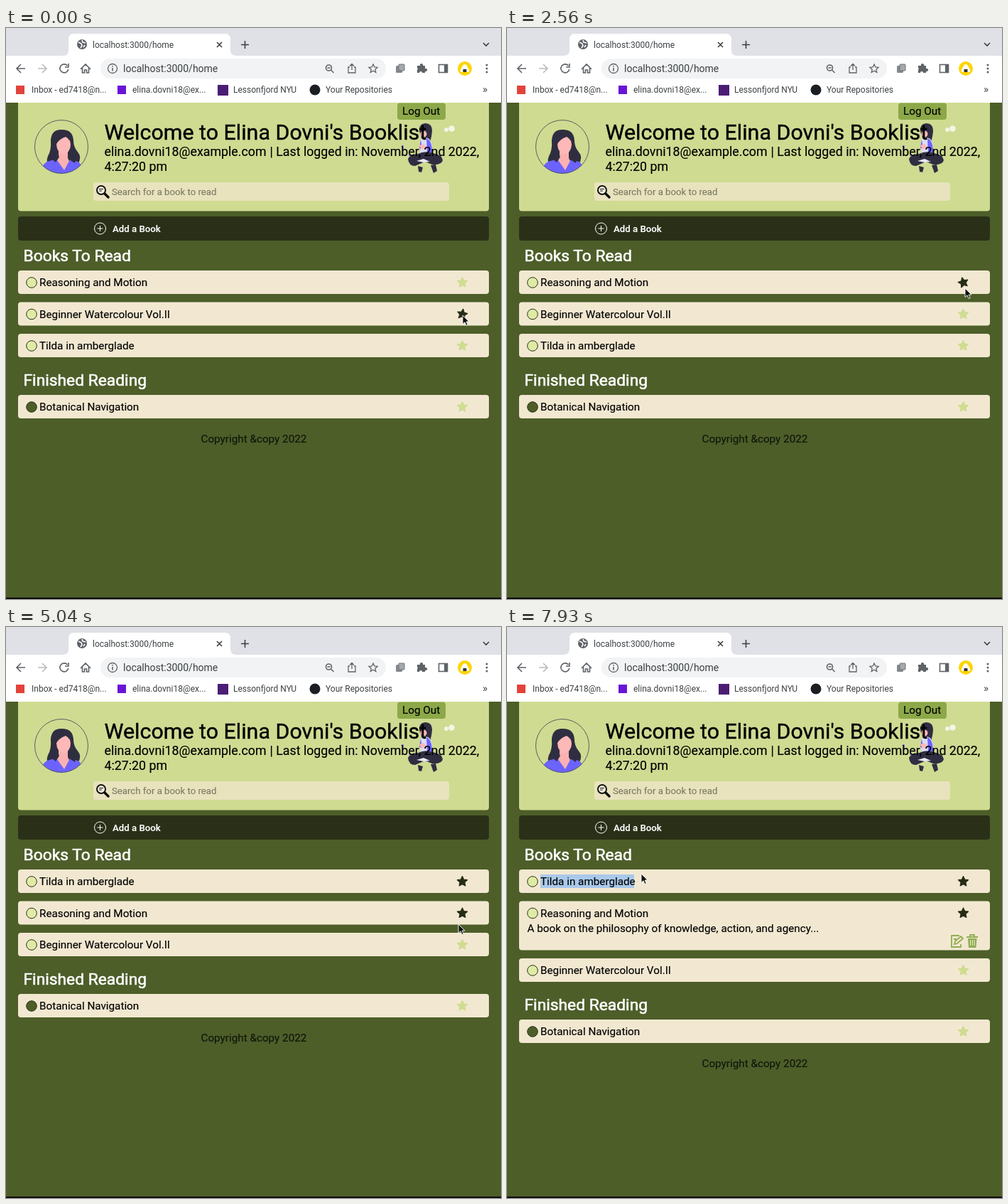
Write an HTML page that moves like this. It is 697 px wide and 803 px high and loops after 8000 ms.

```html
<!DOCTYPE html>
<html lang="en">
<head>
<meta charset="utf-8">
<title>Booklist</title>
<style>
  html, body { margin: 0; width: 100%; height: 100%; overflow: hidden; background: #4d5e29; }
  svg { display: block; width: 697px; height: 803px; font: 15.25px Roboto, sans-serif; }
  .ui { font-size: 12px; fill: #3c4043; }
  .line { fill: none; stroke: #5f6368; stroke-width: 1.6; }
  .page text { stroke-width: .15px; stroke: currentColor; fill: currentColor; }
  .page .big { font-size: 30.4px; stroke-width: .4px; }
  .mid { font-size: 17.8px; }
  .page .head { font-size: 22.8px; color: #fff; stroke-width: .6px; }
  .small { font-size: 13.2px; }
</style>
</head>
<body>
<svg viewBox="0 0 697 803">
  <!-- browser window -->
  <rect width="697" height="40" fill="#dfe1e6"/>
  <rect y="39" width="697" height="66" fill="#fff"/>
  <path d="M80 39q8 0 8-8V16q0-8 8-8H308q8 0 8 8V31q0 8 8 8z" fill="#fff"/>
  <rect x="133" y="43" width="402" height="28" rx="14" fill="#f1f3f4"/>
  <circle cx="107" cy="23" r="7" fill="#5f6368"/>
  <path d="M102 20l4 2 1 3-2 3M107 17l1 3 4 1M109 27l2-3" stroke="#fff" stroke-width="1.6" fill="none"/>
  <g class="line">
    <path d="M297 20l7 7m0-7l-7 7M331 23.500h11m-5.500-5.500v11M672 21l4 4 4-4" stroke="#3c4043"/>
    <path d="M27 57H15m6-6l-6 6 6 6"/>
    <path d="M45 57H57m-6-6l6 6-6 6" stroke="#b8bbbf"/>
    <path d="M86.500 53a6 6 0 1 0 1.300 5M88 50v5h-5"/>
    <path d="M105 58l7-7 7 7M107.500 56v7h3v-4h3v4h3v-7"/>
    <circle cx="150" cy="57" r="6.500" stroke-width="1.300"/><path d="M150 56v4.500m0-7.500v1.500"/>
    <circle cx="454.500" cy="56" r="4"/><path d="M457.500 59l4 4M452.500 56h4" stroke-width="1.500"/>
    <path d="M484 55h-2v8h10v-8h-2M487 59V51m-3 2.500l3-3 3 3" stroke-width="1.300"/>
    <path d="M517 51l1.800 4 4.200.4-3.200 2.900 1 4.200-3.800-2.200-3.800 2.200 1-4.200-3.200-2.900 4.200-.4z" stroke-width="1.300"/>
    <rect x="609.500" y="51.500" width="12" height="11"/>
  </g>
  <path d="M617 51h5v12h-5z" fill="#5f6368"/>
  <rect x="549" y="53" width="9" height="10" rx="1.500" fill="#85898d"/>
  <rect x="553" y="51" width="8" height="9" rx="1" fill="#a6a9ac" stroke="#6f7377"/>
  <path d="M579 53h4a2.200 2.200 0 1 1 4 0h3v4a2.200 2.200 0 1 1 0 4v2h-4a2 2 0 0 0-4 0h-3v-4a2 2 0 0 0 0-3z" fill="#5f6368"/>
  <circle cx="646" cy="57" r="10" fill="#fdd500"/>
  <path d="M646 51q2 0 3 2l3 6q1 3-2 3h-8q-3 0-2-3l3-6q1-2 3-2z" fill="#fff"/>
  <rect x="643.500" y="58" width="5" height="4" fill="#333"/>
  <path d="M677 52v.01M677 57v.01M677 62v.01" stroke="#5f6368" stroke-width="3" stroke-linecap="round"/>
  <rect x="14" y="81" width="12" height="12" fill="#e2433a"/>
  <rect x="157" y="81" width="12" height="12" fill="#6a14d8"/>
  <rect x="298" y="80" width="15" height="15" fill="#4b1d75"/>
  <circle cx="435" cy="87" r="7.500" fill="#1b1f23"/>
  <g class="ui">
    <text x="122" y="27.500">localhost:3000/home</text>
    <text x="165" y="62" font-size="14">localhost:3000/home</text>
    <text x="36" y="91">Inbox - ed7418@n...</text>
    <text x="178" y="91">elina.dovni18@ex...</text>
    <text x="320" y="91">Lessonfjord NYU</text>
    <text x="450" y="91">Your Repositories</text>
    <text x="671" y="91" font-size="15">»</text>
  </g>

  <g class="page">
    <rect y="105" width="697" height="698" fill="#4d5e29"/>
    <path d="M17 105H680V253.500q0 4-4 4H21q-4 0-4-4z" fill="#cfdb91"/>
    <rect x="551" y="105.500" width="68" height="23.500" rx="4" fill="#8ca848"/>

    <!-- profile portrait -->
    <clipPath id="round"><circle cx="78" cy="167" r="37.500"/></clipPath>
    <g clip-path="url(#round)">
      <path d="M63 158Q64 142 79 143 94 143 95 158 95 167 100 173 108 182 101 191L96 194H63Q55 190 59 180 64 172 63 158z" fill="#2f2e41"/>
      <path d="M50 206Q49 190 61 187L72 184 82 199 90 185 101 188Q107 190 108 206z" fill="#6c63ff"/>
      <path d="M74 170h13v13l2 4-7 13-10-14 2-4z" fill="#fbb1b1"/>
      <ellipse cx="81" cy="164" rx="10" ry="13" fill="#ffb8b8"/>
      <path d="M68 166Q67 148 80 148 93 149 93 166 91 157 84 153 75 156 71 163 71 174 75 181L70 189 62 182z" fill="#2f2e41"/>
      <path d="M92 160Q92 174 99 180L97 190 89 185z" fill="#2f2e41"/>
    </g>
    <circle cx="78" cy="167" r="37.500" fill="none" stroke="#3f3d56" stroke-width=".8"/>

    <!-- reading figure -->
    <g fill="#f3f5e6">
      <circle cx="620" cy="143" r="3"/><circle cx="627.500" cy="141.500" r="4.300"/>
    </g>
    <path d="M582 145Q581 135 590 134 600 134 600 145 599 155 597 160L586 157z" fill="#2f2e41"/>
    <circle cx="588" cy="149" r="4.500" fill="#ffb8b8"/>
    <path d="M584 156q6-4 12 0 5 6 4 20H583z" fill="#dcdcf4"/>
    <path d="M592 155q8 3 8 21h-7zM584 157l-2 12 4 1z" fill="#6c63ff"/>
    <path d="M582 165l6-2 4 5-7 3z" fill="#ffb8b8"/>
    <path d="M566 184Q568 178 580 177 590 172 601 176 614 178 615 186 613 193 600 192L590 188 576 194Q567 194 566 184z" fill="#2f2e41"/>
    <path d="M578 187l10-3 9 4-9 1z" fill="#e9e9f5"/>
    <path d="M580 194l7 2-2 7-4-1zM598 193l7-1 2 9-5 3z" fill="#2f2e41"/>
    <path d="M556 167l3-2v9M567 179l4 1" stroke="#6c63ff" fill="none"/>
    <path d="M628 168h3M630 165v6" stroke="#ffb8b8"/>

    <text x="558" y="122">Log Out</text>
    <text class="big" x="138.500" y="156.500">Welcome to Elina Dovni's Booklist</text>
    <g class="mid">
      <text x="138.500" y="180">elina.dovni18@example.com</text>
      <text x="371.500" y="180">| Last logged in: November, 2nd 2022,</text>
      <text x="138.500" y="201">4:27:20 pm</text>
    </g>
    <rect x="123" y="217" width="501" height="26" rx="4" fill="#e8e3bd"/>
    <path d="M139 233l5 5" stroke="#111" stroke-width="3.500" stroke-linecap="round"/>
    <circle cx="134" cy="228" r="6" fill="#f4f1dc" stroke="#111" stroke-width="2"/>
    <path d="M131 226.500h6M131 229h4" stroke="#111" stroke-width="1.200"/>
    <text class="small" x="149" y="234.500" color="#7c7a66">Search for a book to read</text>

    <rect x="17" y="265" width="663" height="34" rx="4" fill="#2a3018"/>
    <circle cx="132.500" cy="282" r="8" fill="none" stroke="#fff"/>
    <path d="M128.500 282h8m-4-4v8" stroke="#fff"/>
    <text class="small" x="150" y="287" color="#fff" font-weight="500">Add a Book</text>
    <text class="head" x="24.500" y="328">Books To Read</text>
    <g id="rows"></g>
    <g id="finished">
      <text class="head" x="24.500" y="503">Finished Reading</text>
      <text x="274.500" y="582.500" color="#12160a">Copyright &amp;copy 2022</text>
    </g>
    <g id="details">
      <text x="28.500" y="429">A book on the philosophy of knowledge, action, and agency...</text>
      <g fill="none" stroke="#8fae52" stroke-width="1.800">
        <path d="M637 434h-11v16h13v-4M630 446l1-4 8-7 3 3-8 7zM629 439h4"/>
        <path d="M647 436h16M652 435v-2h6v2"/>
      </g>
      <path d="M649 438h12.500l-1 13H650z" fill="#8fae52"/>
      <path d="M652.500 440v8m2.800-8v8m2.800-8v8" stroke="#f2e8d1"/>
    </g>
    <rect y="801" width="697" height="2" fill="#0a0a08"/>
  </g>
  <path id="cursor" d="M0 0V12.500L3 9.800 5 14.500 7.200 13.500 5.200 9H9z" fill="#111" stroke="#fff" stroke-width=".9"/>
</svg>
<script>
const LOOP = 8000, STEP = 80, SPIN = 0.18; // SPIN in degrees per ms
const STAR_X = 642.5;
const REORDER = 4160, SELECT = 6320, EXPAND = 6640, DRAG = 7690;
const slots = [357.5, 402, 446.5];
const $ = id => document.getElementById(id);

// time, x, y
const path = [
  [0, 643, 404], [80, 643, 404], [320, 645, 364], [960, 645, 364],
  [1520, 646, 434], [1840, 646, 434], [2320, 645, 366], [3520, 645, 366],
  [3920, 647, 441], [4160, 647, 441], [4440, 645, 523], [4560, 645, 523],
  [5040, 637, 418], [5280, 639, 407], [5840, 113, 404], [6080, 224, 405],
  [6650, 224, 405], [7450, 22, 365], [DRAG, 22, 365], [7840, 194, 352],
  [7920, 189, 347], [LOOP, 189, 347]
];
const spinStarts = [-55, 240, 1040, 2240, 3800, 4640, 5120];

const starPoints = Array.from({ length: 10 }, (_, i) => {
  const r = i % 2 ? 3.6 : 7.4, a = (i / 5 - 0.5) * Math.PI;
  return `${(r * Math.cos(a)).toFixed(2)},${(r * Math.sin(a)).toFixed(2)}`;
}).join(' ');

function makeRow(title, dot) {
  const g = document.createElementNS('http://www.w3.org/2000/svg', 'g');
  g.innerHTML = `
    <rect x="17" y="-16.500" width="663" height="33" rx="4" fill="#f2e8d1"/>
    <rect x="47" y="-9.500" width="0" height="19" fill="#a9c9eb"/>
    <circle cx="36" cy=".5" r="7.300" fill="${dot}" stroke="#2a3018"/>
    <text x="47" y="5.500">${title}</text>
    <polygon points="${starPoints}" stroke-width="1.200" stroke-linejoin="round"/>`;
  $('rows').append(g);
  const [box, mark, , , star] = g.children;
  return { g, box, mark, star };
}

const open = '#dfeba5';
const reasoning = makeRow('Reasoning and Motion', open);
const painting = makeRow('Beginner Watercolour Vol.II', open);
const tilda = makeRow('Tilda in amberglade', open);
const done = makeRow('Botanical Navigation', '#4d5e29');

function cursorAt(t) {
  const i = path.findIndex(p => p[0] > t);
  const [t0, x0, y0] = path[i - 1], [t1, x1, y1] = path[i];
  const u = (t - t0) / (t1 - t0), e = u * u * (3 - 2 * u);
  return [x0 + (x1 - x0) * e, y0 + (y1 - y0) * e];
}

function placeRow(row, y, starred, t, [cx, cy]) {
  row.g.setAttribute('transform', `translate(0 ${y})`);
  const hover = Math.abs(cx - STAR_X) < 9 && Math.abs(cy - y) < 10;
  const start = spinStarts.findLast(s => s <= t);
  const angle = hover ? (t - start) * SPIN : 0;
  const color = hover || starred ? '#262d17' : '#cfdc92';
  row.star.setAttribute('transform', `translate(${STAR_X} .5) rotate(${angle})`);
  row.star.setAttribute('fill', color);
  row.star.setAttribute('stroke', color);
}

function select(row, from, to) {
  row.mark.setAttribute('x', from);
  row.mark.setAttribute('width', Math.max(0, to - from));
}

function draw(time) {
  const t = Math.floor(time % LOOP / STEP) * STEP;
  const cursor = cursorAt(t);
  const moved = t >= REORDER, expanded = t >= EXPAND, shift = expanded ? 36 : 0;
  const order = moved ? [tilda, reasoning, painting] : [reasoning, painting, tilda];

  order.forEach((row, i) => {
    const starred = row === reasoning ? t >= 640 : row === tilda && moved;
    placeRow(row, slots[i] + (i === 2 ? shift : 0), starred, t, cursor);
  });
  placeRow(done, 532.5 + shift, false, t, cursor);
  reasoning.box.setAttribute('height', expanded ? 69 : 33);
  $('finished').setAttribute('transform', `translate(0 ${shift})`);
  $('details').style.display = expanded ? '' : 'none';

  select(reasoning, 57, t >= SELECT && !expanded ? 198 : 0);
  select(tilda, 47, t >= DRAG ? Math.min(179, cursor[0]) : 0);
  $('cursor').setAttribute('transform', `translate(${cursor})`);
}

function frame(now) {
  draw(now);
  requestAnimationFrame(frame);
}
draw(0);
requestAnimationFrame(frame);
</script>
</body>
</html>
```
